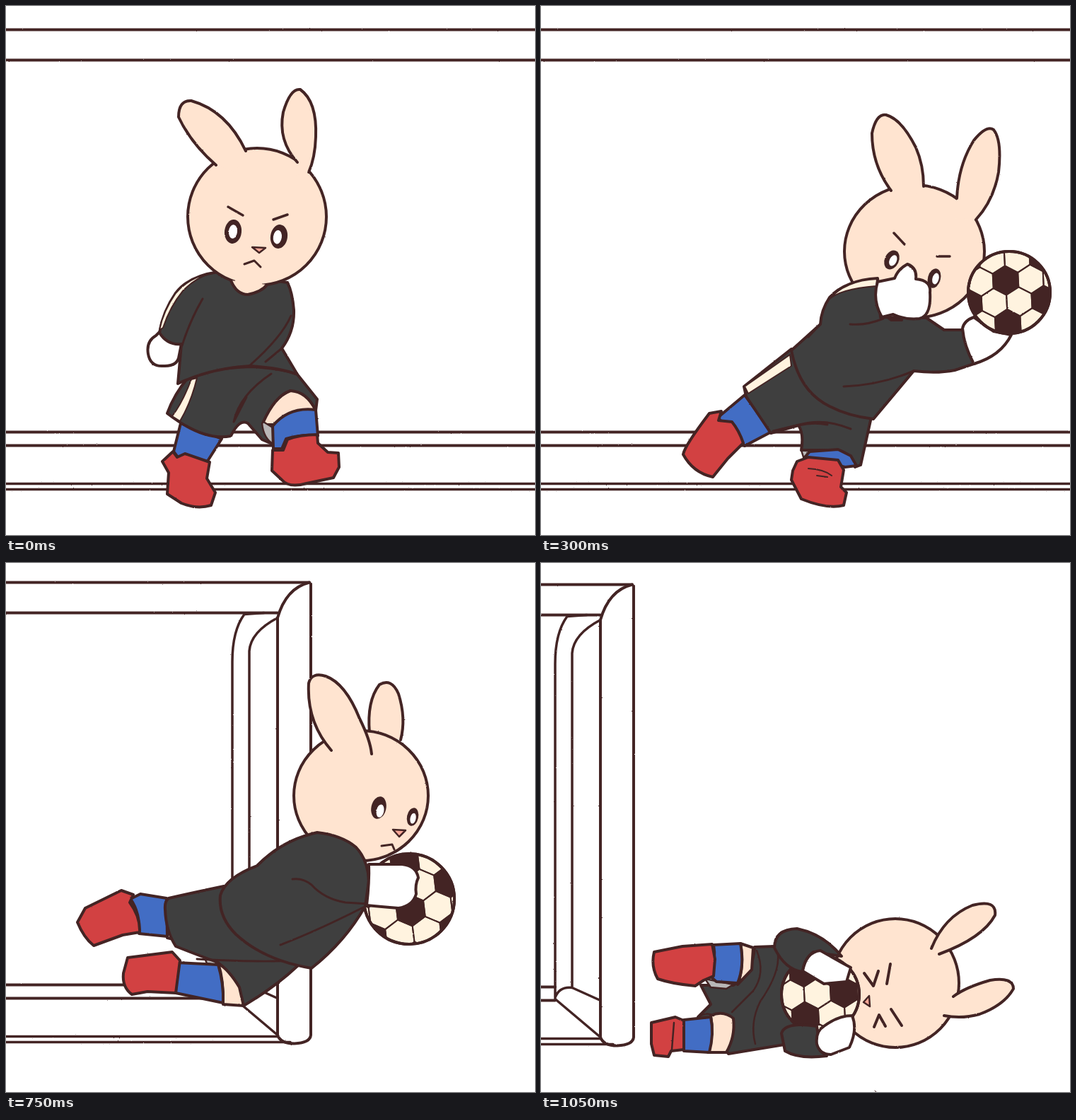
An HTML page for the animation above (1200 ms loop, 748 by 748 pixels).

```html
<!DOCTYPE html>
<html lang="en">
<head>
<meta charset="utf-8">
<title>Rabbit goalkeeper</title>
<style>
html, body { margin: 0; width: 100%; height: 100%; overflow: hidden; background: #fff; }
svg { display: block; width: 100%; height: 100%; }
</style>
</head>
<body>
<svg id="stage" viewBox="0 0 748 748" fill="none" stroke="#432424" stroke-width="4" stroke-linejoin="round" stroke-linecap="round"></svg>
<script>
const INK = '#432424';
const CREAM = '#fff3df';
const SKIN = '#ffe4d0';
const POSE_MS = 150;

// Drawing helpers, each returns SVG markup
const fillWith = (color, width = 4) => d => `<path d="${d}" fill="${color}" stroke-width="${width}"/>`;
const skin = fillWith(SKIN);
const bare = fillWith(SKIN, 0);
const cloth = fillWith('#3f3f3f');
const blue = fillWith('#426dc4');
const red = fillWith('#d24142');
const white = fillWith('#fff');
const gray = fillWith('#b9b7b7', 2.5);
const pink = fillWith('#f9a898', 2.5);
const stripe = fillWith(CREAM, 2);
const patch = fillWith(INK, 2);
const line = (d, width = 3) => `<path d="${d}" stroke-width="${width}"/>`;
const move = (transform, content) => `<g transform="${transform}">${content}</g>`;
const oval = (x, y, rx, ry, fill = SKIN, extra = '') =>
  `<ellipse cx="${x}" cy="${y}" rx="${rx}" ry="${ry}" fill="${fill}" ${extra}/>`;
const eye = (x, y, rx, ry, tilt, dx = 0, dy = 0) => move(`translate(${x} ${y}) rotate(${tilt})`,
  oval(0, 0, rx, ry, INK, 'stroke="none"') + oval(dx, dy, rx * .5, ry * .58, '#fff', 'stroke="none"'));
// The root point lies inside the head, so the fill hides the head's outline under the ear
const ear = (d, root) => bare(`${d}L${root}Z`) + line(d, 4);

// Goal frame with the near post's right edge at x = 710 + dx
const goal = (dx, dy) => move(`translate(${dx} ${dy})`,
  line('M-700 28H709M-700 71H664M-700 616H600M-700 597H600', 4) +
  line('M-700 670H664M-700 678H682', 3.4) +
  line('M709 28Q676 36 664 78V668Q668 680 688 680Q710 679 711 668V30', 4) +
  line('M645 71L617 73Q600 96 600 140V614L664 668M664 78Q626 98 624 125V598L664 616M600 612Q606 596 624 598', 3.5));

// Football: a honeycomb with every third cell dark, anchored on a dark cell at (cx, cy)
let ballClips = '', ballCount = 0;
function ball(x, y, r, cx, cy, side, spin) {
  const id = `ball${ballCount++}`;
  ballClips += `<clipPath id="${id}"><circle cx="${x}" cy="${y}" r="${r}"/></clipPath>`;
  const polar = (length, degrees) =>
    [length * Math.cos(degrees * Math.PI / 180), length * Math.sin(degrees * Math.PI / 180)];
  const step = side * Math.sqrt(3), u = polar(step, spin + 30), v = polar(step, spin + 90);
  let cells = '';
  for (let i = -4; i <= 4; i++) for (let j = -4; j <= 4; j++) {
    const corners = [0, 1, 2, 3, 4, 5].map(k => {
      const [px, py] = polar(side, spin + k * 60);
      return [cx + i * u[0] + j * v[0] + px, cy + i * u[1] + j * v[1] + py].map(n => n.toFixed(1)).join(' ');
    });
    const d = `M${corners.join('L')}Z`;
    cells += (i - j) % 3 ? line(d, 2) : patch(d);
  }
  return oval(x, y, r, r, CREAM) + `<g clip-path="url(#${id})">${cells}</g>` + oval(x, y, r, r, 'none');
}

const readyBody =
  blue('M247 590L237 630L243 638L254 634L284 645L305 612Z') +
  red('M236 630L242 638L253 633L288 645L284 668L296 688L290 706Q270 712 248 703L228 690L230 660L221 644Z') +
  white('M212 466Q198 474 201 492Q204 510 222 509Q240 510 244 498L248 478L218 460Z') +
  skin('M362 592Q375 555 402 544Q425 542 438 572L378 592Z') +
  cloth('M258 525Q290 512 345 510Q390 512 412 521L440 556L438 572Q425 545 402 544Q380 552 364 588L378 620L362 613L342 590Q330 583 318 608Q280 616 228 576Q238 548 258 525Z') +
  gray('M364 588L377 596L379 620Q364 612 362 590Z') +
  stripe('M262 528L270 526Q262 560 246 587L235 580Q250 560 262 528Z') +
  line('M375 520Q330 550 322 588M340 553L322 588') +
  blue('M377 594Q400 566 438 571L441 608Q420 605 396 612L390 626L378 626Z') +
  red('M377 628L392 628L398 613Q415 606 440 606L441 618L455 631L470 632L471 652L463 667L425 675Q400 682 390 670L376 657Z') +
  cloth('M300 376Q258 382 240 406Q222 432 217 462Q228 480 248 478L243 534Q290 512 345 509Q390 512 412 521L390 484Q408 460 407 430Q405 405 398 391Z') +
  stripe('M292 377Q258 384 240 406Q222 432 217 458L222 455Q232 425 250 403Q268 384 292 377Z') +
  line('M278 414Q260 445 249 480M403 438Q390 468 345 508M390 484L367 503');

const readyHead =
  oval(355, 298, 98, 97) +
  ear('M297 225Q262 195 244 157Q244 133 262 134Q312 148 339 205', '325 235') +
  ear('M412 221Q384 190 392 150Q402 116 416 118Q440 135 438 185Q437 215 428 235', '410 240') +
  skin('M318 388Q326 408 342 408Q362 404 369 394') +
  bare('M322 380H362V396H326Z') +
  eye(321, 319, 12, 17, 6) + eye(386, 326, 12, 17, 8, -2, 1) +
  line('M314 284L335 296M378 302L398 295', 3.5) +
  pink('M348 341L367 342L358 349Z') + line('M337 365L351 360L360 369');

const reaching =
  blue('M250 582L288 550L326 602L288 622Z') +
  red('M238 576L255 573L251 586L270 588Q280 600 286 618L264 640L243 666Q215 660 201 634Q203 622 238 576Z') +
  gray('M368 628L384 630L372 641Z') +
  cloth('M354 485L287 538L290 552L325 604L364 593Q372 605 368 628L420 628Q438 632 444 652L452 649L466 586L470 560Z') +
  stripe('M352 493L288 538L293 548L354 509Z') +
  line('M328 601L365 592Q400 582 438 598M364 593Q385 588 405 592') +
  blue('M373 638L380 630L420 627L438 636L446 650L430 652Z') +
  red('M362 644L378 638L420 642L428 656L424 680L432 688L428 706Q405 712 368 697L354 670L356 657Z') +
  line('M378 654Q400 655 411 664M390 664L405 666', 2) +
  oval(528, 347, 99, 94) +
  ear('M495 261Q468 225 468 180Q474 152 488 154Q510 160 530 200Q541 225 541 255', '520 280') +
  ear('M588 272Q590 225 612 190Q630 168 640 175Q652 190 647 235Q640 275 615 302', '585 300') +
  line('M499 321L514 337M560 354L578 354', 3.5) +
  eye(496, 359, 10, 14, 25, 2, 0) + eye(556, 385, 9, 14, 15, 2, 0) +
  cloth('M476 385Q430 388 408 412Q396 430 395 450L354 487Q365 545 408 566Q435 580 470 584L527 516Q560 520 585 515L615 505L598 458L570 458L545 441L480 440Z') +
  stripe('M475 386Q430 388 406 416Q422 400 474 396Z') +
  skin('M490 440L510 444L495 444Z') +
  line('M428 538Q480 536 527 516M437 450Q460 452 484 442M395 450L378 468') +
  white('M476 390L500 385Q505 372 518 365Q532 370 530 386Q552 388 550 405Q552 438 535 442Q515 444 498 436L482 440Q468 415 476 390Z') +
  white('M596 456Q598 445 612 440L640 460L665 465Q650 495 612 506Q598 480 596 456Z') +
  ball(662, 405, 58, 657, 388, 20.5, 27);

const flying =
  skin('M194 508L214 522L204 528Z') + skin('M228 526L274 554L262 560L232 545Z') +
  blue('M142 500L170 483Q184 505 207 523L178 541Z') +
  red('M128 504L143 499L148 512L160 514L178 541L124 588Q100 582 89 556Q92 544 128 504Z') +
  blue('M225 527Q238 550 270 558L236 588L202 566Z') +
  red('M192 562L203 570Q220 564 236 588L226 605L210 644Q180 646 162 626Q166 595 192 562Z') +
  cloth('M218 405L161 465L168 484Q190 512 214 520L228 526Q250 550 288 560L350 522Z') +
  stripe('M217 424Q190 440 162 466L168 483Q192 448 218 428Z') +
  line('M278 500Q245 507 214 521M270 512L245 512') +
  oval(416, 282, 94, 92) +
  ear('M342 220Q312 198 308 176Q315 168 345 174Q375 184 380 194', '375 220') +
  ear('M426 190Q410 165 415 150Q430 145 458 172Q478 198 479 214', '440 215') +
  line('M398 230Q410 225 425 227', 4) + pink('M438 315Q450 305 462 298Q455 318 444 319Z') +
  cloth('M412 264Q360 275 320 318L214 402Q225 440 270 472Q310 490 348 522Q395 465 410 440Q450 440 502 411L474 370L440 372L405 370L388 352Q410 335 430 306Q428 280 412 264Z') +
  stripe('M410 264Q360 275 322 316L345 298Q375 278 410 264Z') +
  line('M388 352L374 366M385 350L379 370M412 416L408 440') +
  white('M412 262L424 248Q438 222 452 227Q480 225 488 240Q498 260 487 290Q470 304 455 297L430 307Q430 282 412 262Z') +
  white('M474 371Q478 350 492 342L503 340L525 365L550 368Q545 395 502 412Q498 385 474 371Z') +
  ball(554, 308, 59, 551, 313, 22.5, 15);

const landing =
  ball(570, 475, 64, 572, 491, 22.5, -37) +
  skin('M226 505L245 534L228 530Z') +
  blue('M176 475L190 468L227 474L228 528L188 524Q190 495 176 475Z') +
  red('M163 463L180 469L175 480Q190 500 189 522L165 526L124 541Q110 530 101 508L112 488Z') +
  gray('M278 552L298 560L296 568L284 566Z') +
  cloth('M230 474Q265 466 308 457L360 520L412 570Q380 600 336 626Q325 590 300 565Q265 552 240 542Q226 520 225 490Q224 478 230 474Z') +
  skin('M300 566Q315 575 330 600L336 626L307 624Q308 590 300 566Z') +
  blue('M242 565L300 568Q308 595 307 622L240 608Z') +
  red('M172 558L235 550L246 562L240 608L200 606L178 610Q164 600 166 580Z') +
  line('M270 560Q360 565 410 562') +
  skin('M514 240Q510 195 528 172Q545 162 555 185Q566 220 558 250') +
  oval(502, 329, 95, 92) +
  skin('M460 265Q425 225 428 170Q432 154 452 160Q480 170 500 220Q515 250 517 270').replace('/>', ' stroke="none"/>') +
  line('M460 265Q425 225 428 170Q432 154 452 160Q480 170 500 220Q515 250 517 270', 4) +
  eye(527, 346, 10.5, 16, 12, 3, 4) + eye(575, 359, 8, 13, 12, 1, 2) +
  pink('M547 377L565 378L556 387Z') + line('M531 400L546 398L549 405') +
  cloth('M440 381Q475 385 495 402Q512 420 513 450L508 485Q480 535 432 573Q365 562 325 525Q300 500 303 470Q310 445 355 428Q390 392 440 381Z') +
  line('M405 447Q420 445 432 455Q450 475 480 480L512 482M388 540Q440 520 505 487') +
  white('M513 426L560 426Q580 428 583 445Q578 455 580 468Q575 485 555 488Q530 486 510 484Q514 450 513 426Z');

const bouncing =
  skin('M297 547L310 545L304 596L294 594Z') +
  blue('M262 540L299 547L294 596L246 585L258 562Z') +
  red('M213 512L240 505L252 530L265 541L252 560L246 582L215 580L210 550Z') +
  skin('M294 632L306 628L326 680L304 684Z') +
  blue('M265 645L294 632Q305 660 305 684L246 690L250 668Z') +
  red('M208 625L238 618L250 643L265 642L248 670L247 696L230 698L214 685Z') +
  cloth('M310 543Q330 545 360 556L395 552L432 690L345 700Q325 670 320 655L302 620L296 608Z') +
  line('M300 614L362 610') +
  cloth('M405 530Q430 512 482 508L500 550L558 565Q555 600 546 630Q530 675 485 690L432 690Q375 645 357 605Q354 570 362 555Q378 550 393 550Q395 540 405 530Z') +
  line('M392 550Q392 575 412 590') +
  oval(461, 623, 54, 54, CREAM) +
  patch('M500 580Q513 598 513 625L499 607Z') + patch('M439 661L465 658L468 672Q455 679 436 671Z') + patch('M410 605L412 632L407 620Z') +
  line('M410 632L437 626L474 616L499 607L474 580M437 626L434 648L446 660L466 656L474 640L466 622M474 640L496 645L513 625M496 645L500 660M434 648L414 650', 2) +
  white('M408 555Q425 540 440 548Q460 545 470 560Q478 580 475 605Q470 622 448 620Q425 615 408 605Q404 595 412 585Q402 570 408 555Z') +
  white('M458 683L480 670Q500 670 512 650Q520 670 504 686Q480 692 458 683Z') +
  oval(568, 483, 92, 92) +
  ear('M546 408Q530 370 538 330Q550 295 564 298Q590 320 585 375Q584 400 576 412', '560 412') +
  ear('M635 440Q655 410 690 385Q712 374 714 388Q712 420 690 448Q670 470 646 469', '638 455') +
  skin('M494 537Q490 562 515 567Q535 565 538 561') +
  bare('M497 533L540 566L520 564L496 545Z') +
  line('M557 458L566 478M589 501L612 500M543 468L550 492L529 488M602 514L578 518L587 536', 4) +
  pink('M548 513L560 513L554 523Z') + line('M527 528L542 530L544 538');

const resting =
  cloth('M302 543L330 542L400 560L400 680L350 680L265 694L222 642L240 624L226 597L272 597Q300 580 302 543Z') +
  gray('M232 588L272 596L262 602L240 600Z') +
  skin('M282 538L300 544L298 575L278 596Q288 570 282 538Z') +
  blue('M244 540L282 538Q288 570 278 594L248 592L240 585Q248 560 244 540Z') +
  red('M160 550L200 542L242 539L246 560L244 584L230 590L218 598Q185 595 165 588Q155 570 160 550Z') +
  skin('M240 640Q258 632 272 644Q275 670 262 692L236 692Q245 665 240 640Z') +
  blue('M202 646L240 642Q245 665 238 692L202 690Z') +
  red('M156 650L190 642L202 647L202 688L184 690L180 698L160 696L156 680Z') +
  line('M188 650L185 688M222 642Q235 634 244 640M335 552Q338 580 310 620Q295 650 303 680M305 548Q318 580 300 605L270 635', 2.5) +
  oval(501, 594, 90, 91) +
  ear('M552 545Q570 500 610 484Q645 475 642 498Q625 530 563 553', '550 555') +
  ear('M583 613Q600 600 635 590Q668 585 668 602Q655 625 620 638Q595 645 570 640', '565 625') +
  line('M457 580L470 598L477 577M494 567L489 595M471 656L478 639L487 655M495 631L510 654', 4) +
  pink('M464 612L456 621L465 627Z') +
  ball(395, 610, 55, 428, 607, 21.5, -33) +
  cloth('M330 544Q330 518 362 517Q400 525 425 556L385 550Q372 560 370 578Q345 575 330 544Z') +
  cloth('M340 665Q345 648 390 655L395 690L404 697Q365 702 345 690Z') +
  white('M370 577Q375 550 395 548L425 565L438 572L432 592L400 595Z') +
  white('M390 680Q388 662 400 655Q420 640 440 640Q448 660 436 685L410 695Q394 695 390 680Z') +
  line('M472 746L474 748', 1);

const poses = [
  goal(600, 5.5) + readyBody + readyHead,
  goal(600, 5.5) + move('matrix(1 0 -.24 .947 170 49)', readyBody) + move('translate(76 28)', readyHead),
  goal(600, 5.5) + reaching,
  goal(0, 0) + flying,
  goal(-140, 0) + move('translate(41 40) rotate(10 350 400)', flying),
  goal(-280, -.5) + landing,
  goal(-454.5, 3) + bouncing,
  goal(-580, 2.5) + resting
];

const stage = document.getElementById('stage');
stage.innerHTML = `<defs>${ballClips}</defs>
<filter id="rough" x="0" y="0" width="748" height="748" filterUnits="userSpaceOnUse" color-interpolation-filters="sRGB">
  <feTurbulence type="fractalNoise" baseFrequency=".35" numOctaves="2"/>
  <feDisplacementMap in="SourceGraphic" scale="1.6" xChannelSelector="R" yChannelSelector="G"/>
</filter>` + poses.map(pose => `<g filter="url(#rough)" display="none">${pose}</g>`).join('');
const layers = stage.querySelectorAll(':scope > g');

let shown = -1;
const start = performance.now();
function render() {
  const index = Math.floor((performance.now() - start) / POSE_MS) % poses.length;
  if (index !== shown) {
    layers.forEach((layer, i) => layer.setAttribute('display', i === index ? 'inline' : 'none'));
    shown = index;
  }
  requestAnimationFrame(render);
}
render();
</script>
</body>
</html>
```
